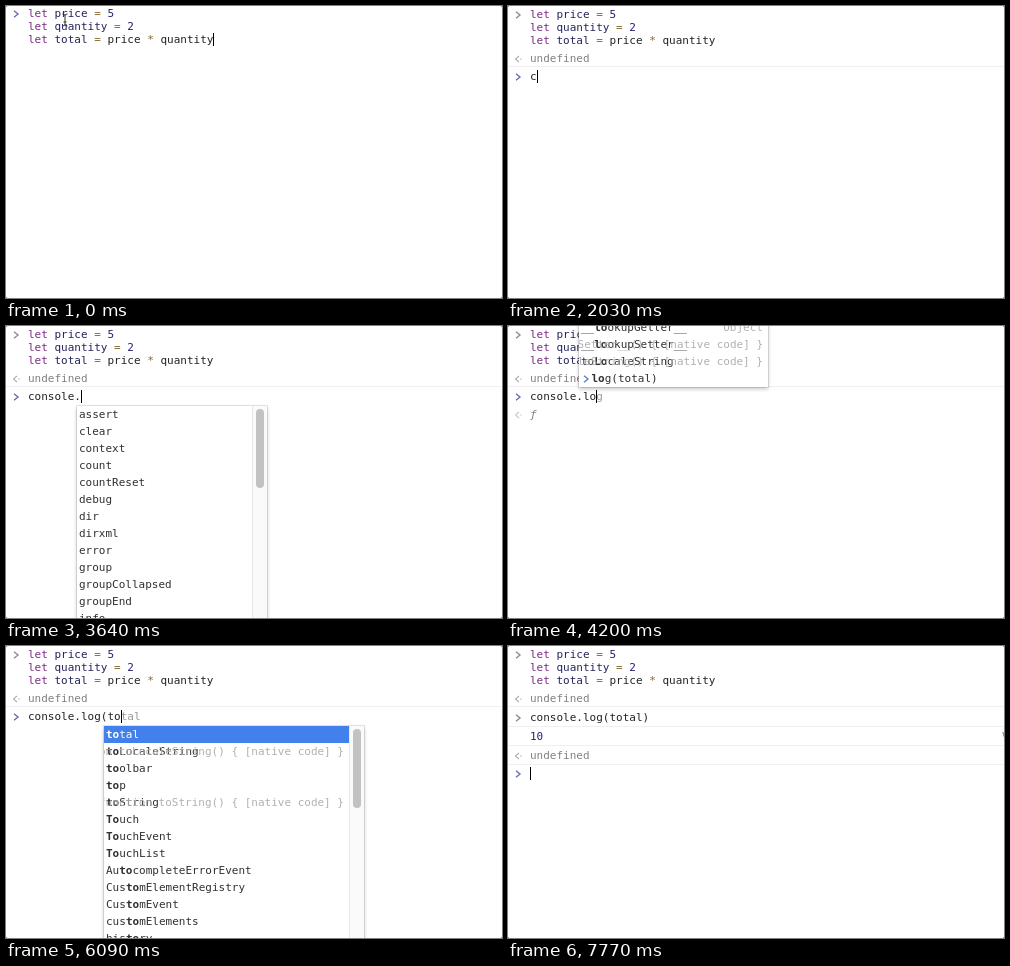
Animation, 496 px wide and 292 px high, one loop 8 s. Source, as an HTML page:

```html
<!DOCTYPE html>
<html lang="en">
<head>
<meta charset="utf-8">
<title>Console session</title>
<style>
  html, body { margin: 0; width: 100%; height: 100%; overflow: hidden; background: #fff; }
  #stage {
    position: relative; width: 496px; height: 292px; overflow: hidden; background: #fff;
    font: 11px/13px "DejaVu Sans Mono", monospace; color: #222;
  }
  #stage div, #stage svg { position: absolute; white-space: pre; }
  svg { fill: none; overflow: visible; }
  .key { color: #7c2a86; }
  .def { color: #23235c; }
  .num { color: #24246f; }
  .op { color: #85672f; }
  .bad { color: #a83232; }
  .gray { color: #808080; }
  .ghost { color: #9a9a9a; }
  .rule { left: 0; width: 496px; height: 1px; background: #f0f0f0; }
  .caret { width: 1px; height: 13px; background: #000; }
  .popup { background: #fff; box-shadow: 0 0 0 1px rgba(0,0,0,.1), 0 2px 4px rgba(0,0,0,.24); overflow: hidden; }
  .row { left: 0; height: 17px; line-height: 17px; padding-left: 2px; box-sizing: border-box; color: #303030; }
  .row.past { padding-left: 12.5px; }
  .row.picked { background: #4281eb; color: #fff; }
  .note { right: 5px; color: #b0b0b0; }
  .track { right: 0; top: 0; width: 15px; height: 100%; background: #fafafa; box-shadow: inset 1px 0 #e8e8e8; }
  .thumb { left: 4px; top: 3px; width: 8px; height: 79px; border-radius: 4px; background: #c2c2c2; }
  .corner { width: 1px; height: 1px; background: #999; }
</style>
</head>
<body>
<div id="stage"></div>
<script>
const LOOP = 8000, CHAR = 6.623, LEFT = 22, ROW = 17;
const stage = document.getElementById('stage');

const span = (cls, s) => `<span class="${cls}">${s}</span>`;
const text = (x, y, html, cls = '') => `<div class="${cls}" style="left:${x}px;top:${y}px">${html}</div>`;
const rule = y => `<div class="rule" style="top:${y}px"></div>`;
const caretAt = (x, y) => text(x, y, '', 'caret');
const icon = (x, y, d, color, width = 1.4) =>
  `<svg width="1" height="1" style="left:${x}px;top:${y}px"><path d="${d}" stroke="${color}" stroke-width="${width}"/></svg>`;
const chevron = (x, y, color) => icon(x, y, 'M0-3.3L4 0L0 3.3', color);
const resultIcon = (y, color) => icon(7, y, 'M4-3L.5 0L4 3M5.2 0H6.8', color, 1.1);

// Popup contents; a leading ">" marks an entry from the input history.
const popup = (names, width, below = false, notes = {}) => ({ rows: names.split(' '), width, below, notes });
const lists = {
  c: popup('caches cancelAnimationFrame cancelIdleCallback captureEvents CDATASection ChannelMergerNode ChannelSplitterNode CharacterData clearInterval clearTimeout clientInformation ClipboardEvent close', 280, true),
  co: popup('confirm console Comment CompositionEvent ConstantSourceNode ConvolverNode CountQueuingStrategy decodeURI decodeURIComponent encodeURI encodeURIComponent oncontextmenu AbortController', 280, true),
  con: popup('confirm console ConstantSourceNode ConvolverNode OverconstrainedError oncontextmenu AbortController AudioContext BaseAudioContext CSSConditionRule CanvasRenderingContext2D CredentialsContainer HTMLContentElement', 280, true),
  cons: popup('console ConstantSourceNode OverconstrainedError constructor >console.log(total)', 190, false, { constructor: 'Window' }),
  console: popup('console >console.log(total)', 171),
  dot: popup('assert clear context count countReset debug dir dirxml error group groupCollapsed groupEnd info', 190, true),
  l: popup('log clear dirxml groupCollapsed profile profileEnd table timeline timelineEnd __lookupGetter__ __lookupSetter__ toLocaleString valueOf', 190, true, { __lookupGetter__: 'Object' }),
  lo: popup('log __lookupGetter__ __lookupSetter__ toLocaleString >log(total)', 189, false, { __lookupGetter__: 'Object' }),
  log: popup('log >log(total)', 116),
  args: popup('>total)', 91),
  t: popup('total TaskAttributionTiming Text TextDecoder TextEncoder TextEvent TextMetrics this throw TimeRanges toLocaleString toolbar top', 280, true),
  to: popup('total toLocaleString toolbar top toString Touch TouchEvent TouchList AutocompleteErrorEvent CustomElementRegistry CustomEvent customElements history', 260, true),
  tot: popup('total isPrototypeOf >total)', 170, false, { isPrototypeOf: 'Object' }),
  total: popup('total >total)', 91),
};

function emphasize(name, query) {
  const at = name.toLowerCase().indexOf(query.toLowerCase());
  if (!query || at < 0) return name;
  const end = at + query.length;
  return `${name.slice(0, at)}<b>${name.slice(at, end)}</b>${name.slice(end)}`;
}

function drawPopup(list, start, query) {
  const { rows, width, below, notes } = list;
  const height = rows.length * ROW;
  const left = Math.floor(LEFT + start * CHAR) - 3;
  const top = below ? 80 : 61 - height;
  const rowWidth = below ? width - 15 : width;
  const body = rows.map((entry, i) => {
    const past = entry[0] === '>', name = past ? entry.slice(1) : entry;
    const cls = past ? 'row past' : i === 0 && query ? 'row picked' : 'row';
    const note = notes[name] ? `<div class="note" style="top:0">${notes[name]}</div>` : '';
    return `<div class="${cls}" style="top:${i * ROW}px;width:${rowWidth}px">${emphasize(name, query)}${note}</div>`
      + (past ? chevron(5, i * ROW + 8.5, '#5b82bd') : '');
  }).join('');
  const bar = below ? '<div class="track"><div class="thumb"></div></div>' : '';
  return `<div class="popup" style="left:${left}px;top:${top}px;width:${width}px;height:${height}px">${body}${bar}</div>`;
}

function drawScript(y) {
  const line = (name, value) => `${span('key', 'let')} ${span('def', name)} ${span('op', '=')} ${value}`;
  return [
    line('price', span('num', 5)),
    line('quantity', span('num', 2)),
    line('total', `price ${span('op', '*')} quantity`),
  ].map((html, i) => text(LEFT, y + 13 * i, html)).join('');
}

const pointer = icon(58.5, 14, 'M-2.5-6Q0-6 0-4.5Q0-6 2.5-6M0-5V5M-2.5 6Q0 6 0 4.5Q0 6 2.5 6M-1.5 2H1.5', '#333', 1);
const ACTIVE = '#6670b0', PAST = '#8c8c8c';
const preview = `console {${['debug', 'error', 'info', 'log', 'warn'].map(n => `${n}: <i>ƒ</i>, `).join('')}…}`;

const draft = caret => drawScript(1) + chevron(8, 7.5, ACTIVE) + (caret ? caretAt(207, 27) : '') + pointer;

const session = () => drawScript(2) + chevron(8, 8.5, PAST)
  + resultIcon(52.5, '#b0b0b0') + text(LEFT, 46, 'undefined', 'gray') + rule(60);

function prompt(input, { list, start = 0, caret = true, result, dim, bad } = {}) {
  const query = input.slice(start);
  const first = list ? lists[list].rows[0] : '';
  const rest = query && first.startsWith(query) ? first.slice(query.length) : '';
  const typed = bad ? input.slice(0, -1) + span('bad', input.slice(-1)) : input;
  return session()
    + chevron(8, 71, dim ? '#a4a4bc' : ACTIVE)
    + text(LEFT, 64, typed + span('ghost', rest))
    + (result === undefined ? '' : resultIcon(89, '#c8c8c8') + text(LEFT, 82, result, 'gray'))
    + (list ? drawPopup(lists[list], start, query) : '')
    + (caret ? caretAt(Math.round(LEFT + input.length * CHAR), 64) : '');
}

const finished = () => session()
  + chevron(8, 71.5, PAST) + text(LEFT, 65, 'console.log(total)') + rule(80)
  + text(LEFT, 84, '10', 'num') + text(494, 84, 'V', 'gray') + rule(99)
  + resultIcon(109.5, '#b0b0b0') + text(LEFT, 103, 'undefined', 'gray') + rule(118)
  + chevron(8, 128, ACTIVE) + caretAt(LEFT, 121);

const FN = '<i>ƒ</i>';
const member = (name, list, more) => prompt('console.' + name, { list, start: 8, ...more });
const argument = (name, list, more) => prompt('console.log(' + name, { list, start: 12, ...more });

const steps = [
  [0, () => draft(true)],
  [490, () => draft(false)],
  [630, () => prompt('')],
  [1330, () => prompt('', { caret: false })],
  [1890, () => prompt('')],
  [2030, () => prompt('c')],
  [2100, () => prompt('c', { list: 'c', result: '' })],
  [2310, () => prompt('co', { list: 'co', result: FN })],
  [2730, () => prompt('con', { list: 'con', result: FN })],
  [3010, () => prompt('cons', { list: 'cons', result: preview })],
  [3080, () => prompt('conso', { list: 'console', result: preview })],
  [3220, () => prompt('consol', { list: 'console', result: preview })],
  [3360, () => prompt('console', { list: 'console', result: preview })],
  [3640, () => member('', 'dot')],
  [3850, () => member('l', 'l', { result: FN })],
  [4060, () => member('lo', 'lo', { result: FN })],
  [4340, () => member('log', 'log', { result: FN })],
  [4900, () => member('log', 'log', { result: FN, caret: false })],
  [5390, () => argument('', 'args', { dim: true, bad: true })],
  [5880, () => argument('t', 't')],
  [6090, () => argument('to', 'to')],
  [6230, () => argument('tot', 'tot')],
  [6440, () => argument('tota', 'total')],
  [6790, () => argument('total', 'total')],
  [7350, () => argument('total)')],
  [7700, finished],
];

const corners = [[0, 0], [495, 0], [0, 291], [495, 291]].map(([x, y]) => text(x, y, '', 'corner')).join('');
let shown = -1;

function tick() {
  const time = performance.now() % LOOP;
  const index = steps.filter(([at]) => at <= time).length - 1;
  if (index !== shown) {
    shown = index;
    stage.innerHTML = steps[index][1]() + corners;
  }
  requestAnimationFrame(tick);
}
tick();
</script>
</body>
</html>
```
